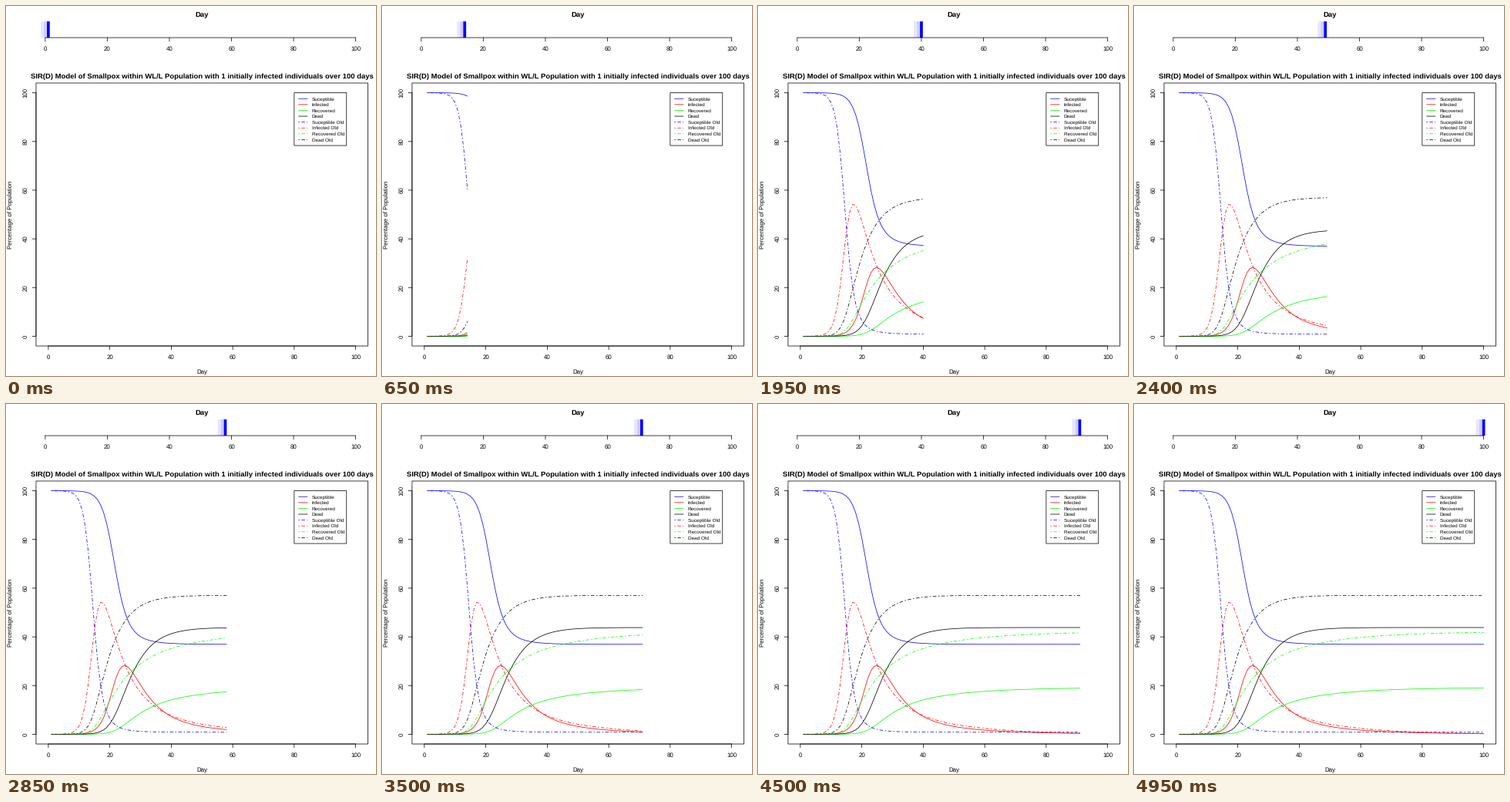
A matplotlib script for the animation above (5 s loop, 480x480 px).

```python
import matplotlib.pyplot as plt
import numpy as np
from matplotlib.animation import FuncAnimation
from matplotlib.patches import Rectangle

plt.rcParams["font.family"] = "Liberation Sans"
plt.rcParams["text.hinting"] = "none"

SIZE, DPI = 480, 100
PT = 72 / DPI            # points per pixel
STROKE = 0.75 * PT
LINE = 9.504             # height of one margin line
FONT, TITLE, SMALL = 7.92, 9.504, 6.336
LEFT, RIGHT = 4.1 * LINE, SIZE - 1.1 * LINE
TOP, BOTTOM = 80 + 2.1 * LINE, SIZE - 4.1 * LINE
BAR_TOP, BAR_BOTTOM = 2.1 * LINE, 80 - 4.1 * LINE
BAR_WIDTH = 3.75
DAYS = 100
DOTDASH = (0, (4 / 3, 4, 16 / 3, 4))
COLORS = ["#0000ff", "#ff0000", "#00ff00", "#000000"]

CONTACT = 0.0155         # infections per day, susceptible and severe case
DEATH = 0.185            # daily rates
FAST, SLOW = 0.16, 0.05


def bar_x(day):
    return LEFT + (day + 2.96) / 106.92 * (RIGHT - LEFT)


def plot_x(day):
    return LEFT + (day + 4) / 108 * (RIGHT - LEFT)


def plot_y(value):
    return BOTTOM - (value + 4) / 108 * (BOTTOM - TOP)


def epidemic(days, immune, severity, level, level_day):
    """Susceptible, infected, recovered and dead in percent.

    Severe cases spread the disease and die; mild ones recover, half of
    them slowly. Time is shifted so that the susceptible reach `level`
    on `level_day`.
    """
    dt = 0.02
    open_share, severe = 100 - immune, 1e-4
    onset = fast = slow = recovered = dead = 0.0
    rows = []
    for _ in range(int(160 / dt)):
        rows.append((immune + open_share, severe + onset + fast + slow,
                     recovered, dead))
        new = CONTACT * open_share * severe * dt
        deaths, cured_fast, cured_slow = DEATH * severe * dt, FAST * fast * dt, SLOW * slow * dt
        settled = onset * dt
        open_share -= new
        severe += severity * new - deaths
        onset += (1 - severity) * new - settled
        fast += settled / 2 - cured_fast
        slow += settled / 2 - cured_slow
        recovered += cured_fast + cured_slow
        dead += deaths
    curves = np.array(rows).T
    time = np.arange(len(rows)) * dt
    time += level_day - np.interp(-level, -curves[0], time)
    return [np.interp(days, time, c) for c in curves]


fig = plt.figure(figsize=(SIZE / DPI, SIZE / DPI), dpi=DPI, facecolor="white")
ax = fig.add_axes([0, 0, 1, 1])
ax.set_xlim(0, SIZE)
ax.set_ylim(SIZE, 0)
ax.axis("off")


def text(x, y, s, size=FONT, ha="center", **kw):
    ax.text(x, y, s, fontsize=size * PT, ha=ha, va="baseline",
            rotation_mode="anchor", **kw)


def curve(color, old=False, xs=(), ys=()):
    return ax.plot(xs, ys, color=color, lw=STROKE, ls=DOTDASH if old else "-",
                   snap=False, solid_capstyle="round", dash_capstyle="round")[0]


def rule(x0, y0, x1, y1):
    curve("black", False, [x0, x1], [y0, y1])


def frame(x0, y0, x1, y1):
    ax.add_patch(Rectangle((x0, y0), x1 - x0, y1 - y0, fill=False,
                           ec="black", lw=STROKE, snap=False))


def x_axis(to_x, y):
    rule(to_x(0), y, to_x(100), y)
    for v in range(0, 101, 20):
        rule(to_x(v), y, to_x(v), y + LINE / 2)
        text(to_x(v), y + 1.8 * LINE, str(v))


def y_axis():
    rule(LEFT, plot_y(0), LEFT, plot_y(100))
    for v in range(0, 101, 20):
        rule(LEFT - LINE / 2, plot_y(v), LEFT, plot_y(v))
        text(LEFT - 1.2 * LINE, plot_y(v), str(v), rotation=90)


def draw_legend():
    x, y, char = plot_x(80), plot_y(100), 5.702
    step = SMALL * 1.2
    frame(x, y, x + 67.9, y + 9 * step)
    names = ["Suceptible", "Infected", "Recovered", "Dead"]
    for i in range(8):
        old = i >= 4
        row = y + (i + 1) * step
        curve(COLORS[i % 4], old, [x + char, x + 3 * char], [row, row])
        text(x + 4 * char, row + 2.2, names[i % 4] + (" Old" if old else ""),
             SMALL, ha="left")


middle = (LEFT + RIGHT) / 2
x_axis(bar_x, BAR_BOTTOM)
x_axis(plot_x, BOTTOM)
y_axis()
frame(LEFT, TOP, RIGHT, BOTTOM)
text(middle, 14, "Day", TITLE, weight="bold")
text(middle, 94, "SIR(D) Model of Smallpox within WL/L Population with 1 "
     "initially infected individuals over 100 days", TITLE, weight="bold")
text(middle, BOTTOM + 3.8 * LINE, "Day")
text(LEFT - 3.2 * LINE, (TOP + BOTTOM) / 2, "Percentage of Population", rotation=90)
draw_legend()

days = np.arange(1, DAYS + 1)
xs = plot_x(days)
new_model = epidemic(days, immune=35.3, severity=0.695, level=66.5, level_day=22)
old_model = epidemic(days, immune=0, severity=0.575, level=50, level_day=14.65)
tracks = [(curve(color, old), plot_y(values))
          for model, old in ((new_model, False), (old_model, True))
          for color, values in zip(COLORS, model)]

# The current day and its two fading predecessors.
bars = []
for alpha in (255, 50, 25):
    bar = Rectangle((0, BAR_TOP), BAR_WIDTH, BAR_BOTTOM - BAR_TOP,
                    facecolor=(0, 0, 1, alpha / 255), lw=0, snap=False)
    bars.append(ax.add_patch(bar))


def update(n):
    day = n + 1
    for back, bar in enumerate(bars):
        bar.set_x(bar_x(day - back) - BAR_WIDTH / 2)
    shown = day if day > 1 else 0
    for line, ys in tracks:
        line.set_data(xs[:shown], ys[:shown])
    return bars + [line for line, _ in tracks]


anim = FuncAnimation(fig, update, frames=DAYS, interval=50, repeat=True,
                     repeat_delay=0, blit=False)
plt.show()
```
